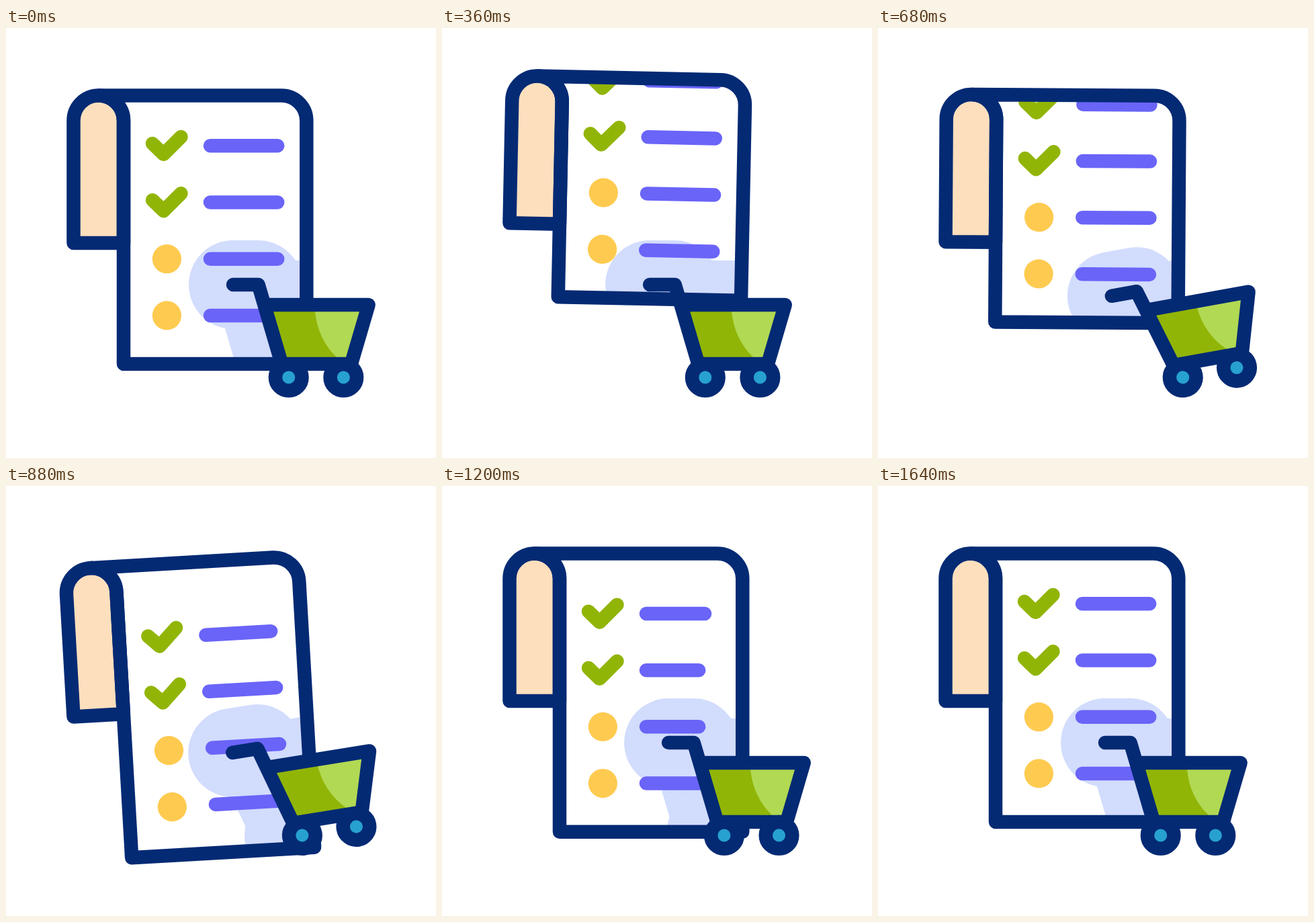
An HTML page with a canvas for the animation above (2 s loop, 640 px wide and 640 px high).

```html
<!DOCTYPE html>
<html lang="en">
<head>
<meta charset="utf-8">
<title>Shopping list</title>
<style>
  html, body { margin: 0; width: 100%; height: 100%; overflow: hidden; background: #fff; }
  canvas { display: block; width: 640px; height: 640px; }
</style>
</head>
<body>
<canvas id="stage"></canvas>
<script>
const LOOP = 2000, STEP = 40, SIZE = 640, LINE = 20.5, HALO = 132;
const NAVY = '#042a74', PEACH = '#fedfbd', PURPLE = '#6a64f8', GREEN = '#91b507',
      LIME = '#b1d953', YELLOW = '#fecb50', TEAL = '#27a1d0', SHADE = '#d2dcfd';

// Each track is a list of [time, value] keys, eased in and out.
const tracks = {
  lift:   [[100, 0], [520, -44], [810, 29], [1060, 0]],
  tilt:   [[120, 0], [620, 2.5], [800, -5.7], [1015, 2], [1180, 0]],
  roll:   [[40, 0], [545, -103], [920, 39], [1400, 0]],
  shrink: [[820, 0], [1080, 23.5], [1340, 0]],
  drive:  [[40, 0], [340, -29.5], [680, 33], [750, 33], [1060, -0.8], [1360, -0.7], [1640, 0]],
  tip:    [[560, 0], [720, -12.1], [1220, 0], [1390, -2.5], [1640, 0]]
};

function at(keys, t) {
  const i = keys.findIndex(k => k[0] > t);
  if (i < 0) return keys[keys.length - 1][1];
  if (i === 0) return keys[0][1];
  const [t0, a] = keys[i - 1], [t1, b] = keys[i];
  const u = (t - t0) / (t1 - t0);
  return a + (b - a) * u * u * (3 - 2 * u);
}

const PIVOT = { x: 100.5, y: 320 };
const WHEEL = { x: 420.7, y: 520 };
const WHEEL_GAP = 81.6;

const fold = new Path2D('M175 320H100.5V137.75a37.25 37.25 0 0 1 74.5 0Z');
const check = new Path2D('M218 172L234.5 188L260.5 162');
const frame = new Path2D('M338 382H375.6L410.3 500H513.8L539.6 412H386');
const basket = new Path2D('M384.4 412H539.6L513.8 500H410.3Z');
const shine = new Path2D('M460 412V422Q464 463 492 490L500 500H513.8L539.6 412Z');

const canvas = document.getElementById('stage');
const ctx = canvas.getContext('2d');
const ratio = window.devicePixelRatio || 1;
canvas.width = canvas.height = SIZE * ratio;
ctx.lineCap = ctx.lineJoin = 'round';

function fill(path, color) {
  ctx.fillStyle = color;
  ctx.fill(path);
}

function stroke(path, color, width = LINE) {
  ctx.strokeStyle = color;
  ctx.lineWidth = width;
  ctx.stroke(path);
}

function disc(x, y, r) {
  const p = new Path2D();
  p.arc(x, y, r, 0, Math.PI * 2);
  return p;
}

const wheels = [0, WHEEL_GAP].map(dx => disc(WHEEL.x + dx, WHEEL.y, 19.8));

// Sets the transform to a turn around a point followed by a shift.
function place(pivot, dx, dy, deg) {
  ctx.setTransform(ratio, 0, 0, ratio, 0, 0);
  ctx.translate(pivot.x + dx, pivot.y + dy);
  ctx.rotate(deg * Math.PI / 180);
  ctx.translate(-pivot.x, -pivot.y);
}

function drawItems(t, roll) {
  for (let i = 0; i < 4; i++) {
    const dy = roll + i * 84.2;
    ctx.save();
    ctx.translate(0, dy);
    if (i < 2) stroke(check, GREEN);
    else fill(disc(239.4, 175.3, 21.6), YELLOW);
    const end = 404.2 - at(tracks.shrink, t - i * 80);
    stroke(new Path2D(`M304 175.3H${end}`), PURPLE);
    ctx.restore();
  }
}

function draw(t) {
  const v = {};
  for (const name in tracks) v[name] = at(tracks[name], t);
  const placePaper = () => place(PIVOT, 0, v.lift, v.tilt);
  const placeCart = () => place(WHEEL, v.drive, 0, v.tip);
  const bottom = 500 + v.roll;
  const sheet = new Path2D(
    `M137.75 100.5H410a37.3 37.3 0 0 1 37.3 37.3V${bottom}H175V137.75A37.25 37.25 0 0 0 137.75 100.5Z`);

  ctx.setTransform(ratio, 0, 0, ratio, 0, 0);
  ctx.fillStyle = '#fff';
  ctx.fillRect(0, 0, SIZE, SIZE);

  placePaper();
  fill(fold, PEACH);
  fill(sheet, '#fff');

  ctx.save();
  ctx.clip(sheet);
  placeCart();
  [frame, ...wheels].forEach(p => stroke(p, SHADE, HALO));
  placePaper();
  drawItems(t, v.roll);
  ctx.restore();

  placePaper();
  stroke(fold, NAVY);
  stroke(sheet, NAVY);

  placeCart();
  fill(basket, GREEN);
  fill(shine, LIME);
  stroke(frame, NAVY);
  for (const w of wheels) {
    fill(w, TEAL);
    stroke(w, NAVY);
  }
}

const start = performance.now();
function tick() {
  const t = (performance.now() - start) % LOOP;
  draw(Math.floor(t / STEP) * STEP);
  requestAnimationFrame(tick);
}
tick();
</script>
</body>
</html>
```
